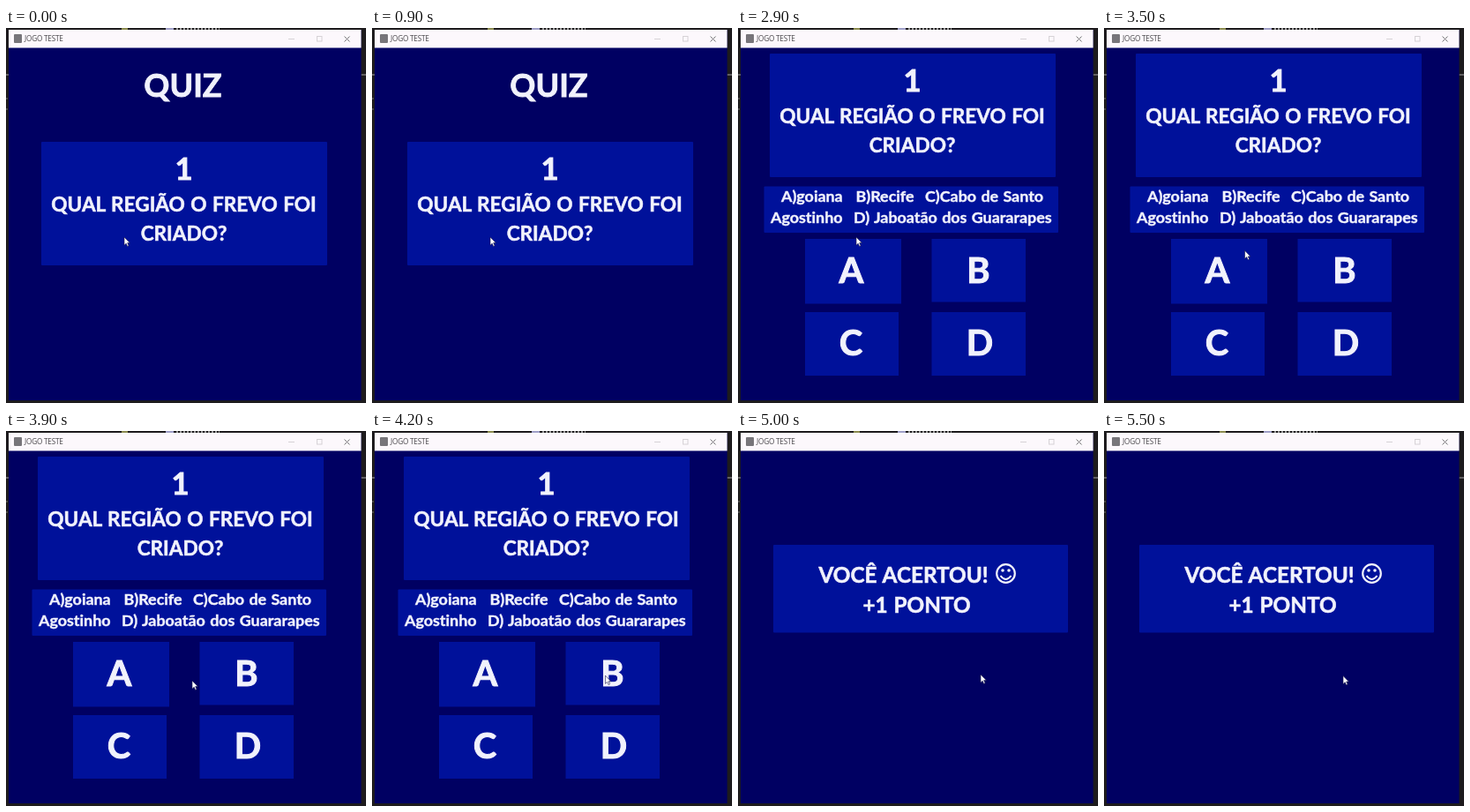
Write an HTML page that moves like this. It is 408x425 px and loops after 5600 ms.

```html
<!DOCTYPE html>
<html lang="pt">
<head>
<meta charset="utf-8">
<style>
html, body { margin: 0; width: 100%; height: 100%; overflow: hidden; background: #1d1b1d; }
svg { display: block; width: 408px; height: 425px; }
.game { font-family: Lato, "Open Sans", sans-serif; font-weight: 700; fill: #f1f2fc; word-spacing: .06em; font-variant-ligatures: none; }
.game text, #question text { stroke: #f1f2fc; stroke-width: .025em; }
.mid { text-anchor: middle; }
.panel { fill: #00119a; }
.bar { font: 8.2px "Open Sans", sans-serif; letter-spacing: -.2px; fill: #4a484c; }
</style>
</head>
<body>
<svg viewBox="0 0 408 425">
  <defs>
    <g id="question" class="mid">
      <rect class="panel" x="40" y="129" width="324" height="140" rx="1"/>
      <text x="201.5" y="172" font-size="34.7">1</text>
      <text x="201.5" y="208" font-size="22.6">QUAL REGIÃO O FREVO FOI</text>
      <text x="201.5" y="240.5" font-size="22.6">CRIADO?</text>
    </g>
  </defs>

  <!-- desktop behind the window -->
  <rect width="408" height="425" fill="#1d1b1d"/>
  <path d="M0 53H3M402.5 53H408" stroke="#a8a6a8"/>
  <path d="M0 80H2M0 92H2" stroke="#777"/>
  <path d="M131 1H138" stroke="#8c8c50" stroke-width="2"/>
  <path d="M181 1H190" stroke="#a0a0c8" stroke-width="2"/>
  <path d="M193 1H242" stroke="#999" stroke-width="2" stroke-dasharray="2 2"/>

  <!-- window -->
  <rect x="3" y="2" width="399.5" height="420" fill="#000062"/>
  <rect x="3" y="2" width="399.5" height="20.5" fill="#fcf8fc"/>
  <rect x="9" y="7" width="9" height="10" rx="1" fill="#77757a"/>
  <text class="bar" x="21" y="15.3">JOGO TESTE</text>
  <g fill="none" stroke="#d6d2d6">
    <path d="M320 12.5H327"/>
    <rect x="352.5" y="9.5" width="5.5" height="5.5"/>
    <path d="M383.5 9.5L389.5 15.5M389.5 9.5L383.5 15.5" stroke="#77757a"/>
  </g>

  <g class="game scene">
    <text class="mid" x="200.5" y="78" font-size="36">QUIZ</text>
    <use href="#question"/>
  </g>

  <g class="game scene">
    <use href="#question" x="-4" y="-100"/>
    <rect class="panel" x="29.5" y="179.5" width="333.5" height="52.5" rx="1"/>
    <g font-size="17.9">
      <text x="49" y="197">A)goiana</text>
      <text x="133.5" y="197">B)Recife</text>
      <text x="212" y="197">C)Cabo de Santo</text>
      <text x="37" y="220.5">Agostinho</text>
      <text x="131" y="220.5">D) Jaboatão dos Guararapes</text>
    </g>
    <path class="panel" d="M76 239H185V312.5H76ZM219.5 239H326V310.5H219.5ZM76 322H182V394H76ZM219.5 322H326V394H219.5Z"/>
    <g class="mid" font-size="40">
      <text x="128.5" y="289">A</text>
      <text x="272.5" y="289">B</text>
      <text x="128" y="371">C</text>
      <text x="274" y="371">D</text>
    </g>
  </g>

  <g class="game scene">
    <rect class="panel" x="40" y="129" width="334" height="99.5" rx="1"/>
    <text x="91.5" y="172" font-size="24.3">VOCÊ ACERTOU!</text>
    <text class="mid" x="202.5" y="206" font-size="24.3">+1 PONTO</text>
    <circle cx="303.5" cy="161.5" r="10.3" fill="none" stroke="#f1f2fc" stroke-width="2.2"/>
    <path d="M297.5 164Q303.5 172 309.5 164" fill="none" stroke="#f1f2fc" stroke-width="2"/>
    <circle cx="300" cy="158" r="1.8"/>
    <circle cx="307" cy="158" r="1.8"/>
  </g>

  <path id="cursor" d="M0 0V9.2L2.2 7.2L3.6 10.4L5.1 9.7L3.7 6.6H6.4Z" fill="#fff" stroke="#15154a" stroke-width=".6"/>
</svg>
<script>
const LOOP = 5600, STEP = 100;
const scenes = document.querySelectorAll('.scene');
const cursor = document.getElementById('cursor');
const easeIn = p => p ** 1.3;
const easeOut = p => 1 - (1 - p) ** 1.3;

// cursor legs: start, end, from, to, easing
const legs = [
  [3200, 3900, [134, 237], [211, 283], easeIn],
  [3900, 4300, [211, 283], [275, 276], easeOut],
  [5300, 5500, [275, 276], [271, 277.5], p => p]
];

function cursorAt(t) {
  const [start, end, a, b, ease] = legs.findLast(leg => t >= leg[0]) || legs[0];
  const p = ease(Math.min(1, Math.max(0, (t - start) / (end - start))));
  return a.map((v, i) => v + (b[i] - v) * p);
}

function draw(now) {
  const t = Math.floor(now % LOOP / STEP) * STEP;
  const current = t < 2900 ? 0 : t < 5000 ? 1 : 2;
  scenes.forEach((s, i) => s.style.display = i === current ? '' : 'none');
  cursor.setAttribute('transform', `translate(${cursorAt(t)})`);
}

const begin = performance.now();
function tick() {
  draw(performance.now() - begin);
  requestAnimationFrame(tick);
}
tick();
</script>
</body>
</html>
```
